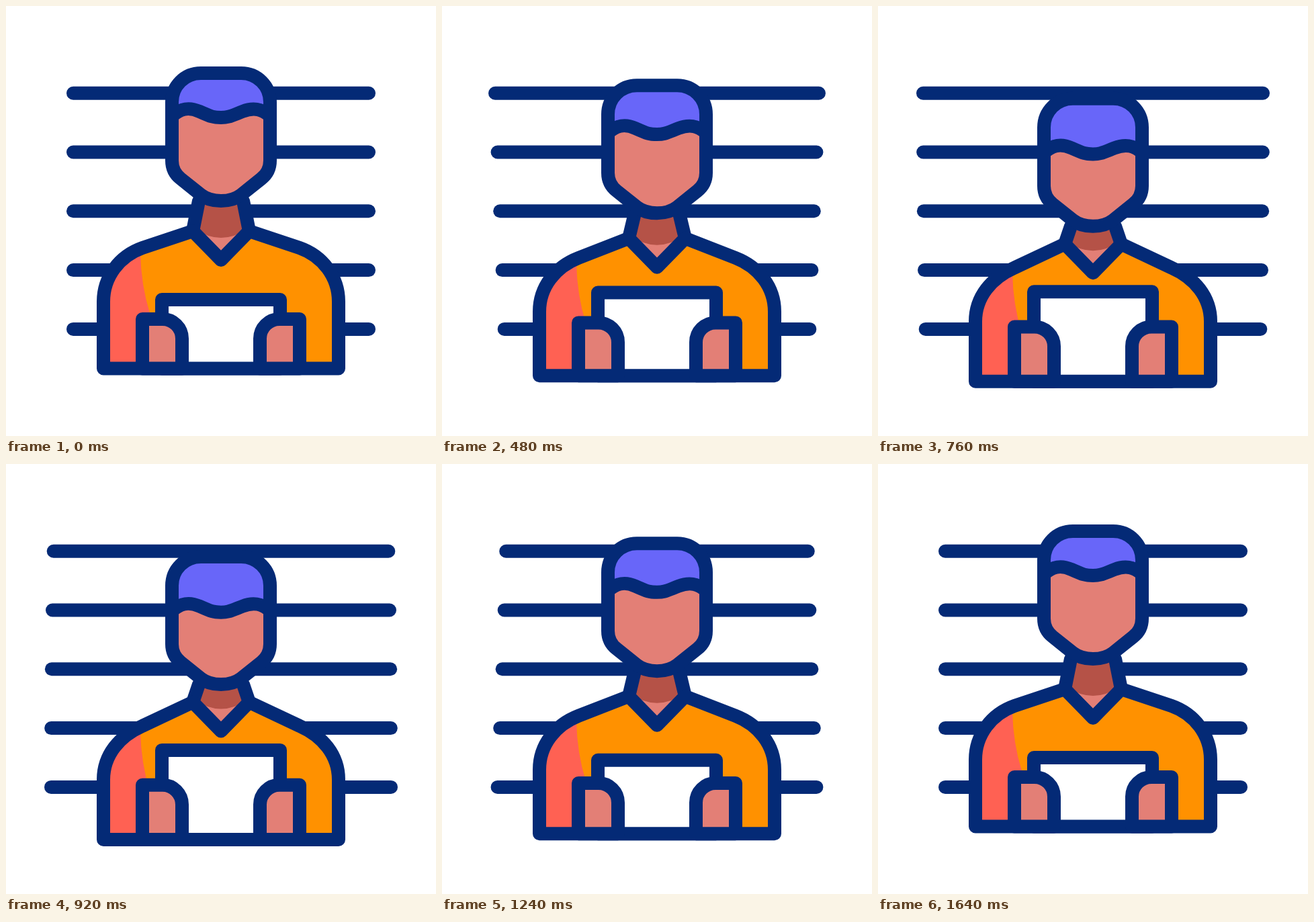
Write an HTML page with a canvas that moves like this. It is 640 px wide and 640 px high and loops after 1680 ms.

```html
<!DOCTYPE html>
<html lang="en">
<head>
<meta charset="utf-8">
<style>
  html, body { margin: 0; height: 100%; overflow: hidden; background: #fff; }
  canvas { display: block; width: 100vw; height: 100vh; }
</style>
</head>
<body>
<canvas width="640" height="640"></canvas>
<script>
const ctx = document.querySelector('canvas').getContext('2d');
const LOOP = 1680, STEP = 40;
const NAVY = '#042a76', SKIN = '#e37f76', SHADE = '#b55247',
      HAIR = '#6866f9', SHIRT = '#ff9100', SLEEVE = '#ff6153';

// cubic-bezier(.45, 0, .55, 1)
function ease(x) {
  if (x <= 0) return 0;
  if (x >= 1) return 1;
  let lo = 0, hi = 1, s;
  for (let i = 0; i < 20; i++) {
    s = (lo + hi) / 2;
    const r = 1 - s;
    if (1.35 * s * r * r + 1.65 * s * s * r + s * s * s < x) lo = s; else hi = s;
  }
  return s * s * (3 - 2 * s);
}

// Goes 0 -> 1 between a and b, then back to 0 between c and d
const swing = (t, a, b, c, d) => ease((t - a) / (b - a)) - ease((t - c) / (d - c));

function shape(d, fill, stroke = true) {
  const path = new Path2D(d);
  if (fill) { ctx.fillStyle = fill; ctx.fill(path); }
  if (stroke) ctx.stroke(path);
  return path;
}

function mirrored(draw) {
  draw();
  ctx.save();
  ctx.translate(640, 0);
  ctx.scale(-1, 1);
  draw();
  ctx.restore();
}

function drawLines(t) {
  for (let i = 0; i < 5; i++) {
    const peak = 760 + 40 * i;
    const grow = 33 * swing(t, peak - 660, peak, peak, peak + 660);
    shape(`M${100 - grow},${129.7 + 87.8 * i}H${540 + grow}`);
  }
}

function drawTorso(body, shoulder, head, sign, hand) {
  const base = 539.5 + body, collar = 335 + body;
  const y = 360 + shoulder, drop = y + 12 + 0.3 * (shoulder - body);
  const chin = 290 + head;

  shape(`M287,${chin}L278,${collar}L320,${collar + 43}L362,${collar}L353,${chin}Z`, SKIN, false);
  shape(`M287,${chin}L280,${collar - 4}Q320,${collar + 24} 360,${collar - 4}L353,${chin}Z`, SHADE, false);

  const shirt = `M278,${collar}L203,${y}C169,${drop} 145,${y + 43} 145,${y + 80}V${base}
    H495V${y + 80}C495,${y + 43} 471,${drop} 437,${y}L362,${collar}L320,${collar + 43}Z`;
  ctx.save();
  ctx.clip(shape(shirt, SHIRT, false));
  shape(`M200,${y - 15}V${y + 8}Q201,${y + 55} 214,${y + 97}L226,${y + 130}V600H130V${y - 15}Z`, SLEEVE, false);
  ctx.restore();
  shape(`M287,${chin}L278,${collar}M353,${chin}L362,${collar}`);
  shape(shirt);

  shape(`M232,${base}V${437 + sign}H408V${base}Z`, '#fff');
  const top = 466 + hand;
  mirrored(() => shape(`M203,${base}V${top}H233C249,${top} 262,${top + 13} 262,${top + 29}V${base}Z`, SKIN));
}

function drawHead(head, hairline) {
  const skull = `M290,100H350C374,100 393,119 393,143V230C393,241 389,250 380,257L350,281
    C341,288 331,290 320,290C309,290 299,288 290,281L260,257C251,250 247,241 247,230V143C247,119 266,100 290,100Z`;
  const wave = `M247,164C258,154 270,149 288,157S309,166 320,166S334,164 352,157S382,154 393,164`;
  ctx.save();
  ctx.translate(0, head);
  ctx.save();
  ctx.clip(shape(skull, SKIN, false));
  ctx.translate(0, hairline);
  shape(wave + 'V40H247Z', HAIR, false);
  shape(wave);
  ctx.restore();
  shape(skull);
  ctx.restore();
}

function frame(now) {
  const t = Math.floor(now % LOOP / STEP) * STEP;
  const body = 19.6 * swing(t, 80, 840, 880, 1640);
  const tilt = 18.9 * swing(t, 205, 825, 845, 1550);
  const lift = 31 * swing(t, 157, 690, 870, 1426);

  ctx.fillStyle = '#fff';
  ctx.fillRect(0, 0, 640, 640);
  ctx.strokeStyle = NAVY;
  ctx.lineWidth = 20;
  ctx.lineCap = ctx.lineJoin = 'round';

  drawLines(t);
  drawTorso(body, body + 0.56 * tilt, body + tilt, body - lift, body - 0.25 * lift);
  drawHead(body + tilt, 0.9 * tilt);
  requestAnimationFrame(frame);
}
requestAnimationFrame(frame);
</script>
</body>
</html>
```
